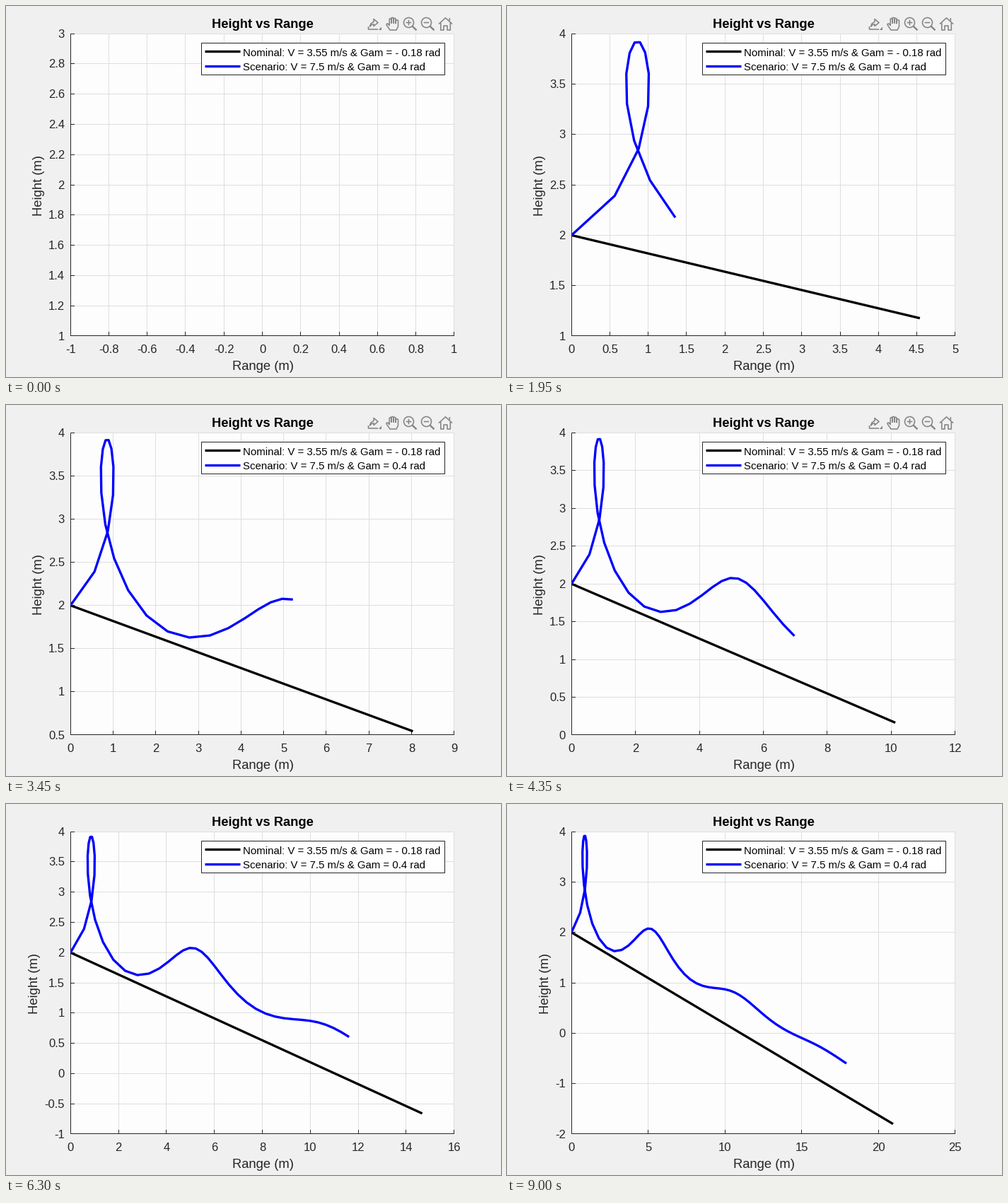
Recreate the animation shown at these times as a matplotlib script. Size 700 by 525 pixels, loop 9150 ms.

```python
import numpy as np
import matplotlib.pyplot as plt
from matplotlib.animation import FuncAnimation
from matplotlib.collections import LineCollection
from matplotlib.patches import Circle, Polygon, Rectangle

plt.rcParams["font.family"] = "Liberation Sans"
plt.rcParams["path.snap"] = False

W, H = 700, 525
PX = 0.72  # points per pixel at 100 dpi
LEFT, RIGHT, TOP, BOTTOM = 91.24, 633.77, 39.1, 466.97
INK, GRID, ICON = "#262626", "#dedede", "#858585"
TICK_SIZE, LABEL_SIZE, LEGEND_SIZE = 16.67, 18.33, 15
FRAMES, STEP_MS = 61, 150
TOOLBAR_FRAMES = 39

# Paper plane: geometry, mass and best-glide aerodynamics
AREA, ASPECT, MASS, GRAV, RHO = 0.017, 0.86, 0.003, 9.8, 1.225
CD0 = 0.02
EPS = 1 / (np.pi * 0.9 * ASPECT)
CL = np.sqrt(CD0 / EPS)
CD = CD0 + EPS * CL**2
GLIDE = -np.arctan(CD / CL)
SPEED = np.sqrt(2 * MASS * GRAV /
                (RHO * AREA * (CL * np.cos(GLIDE) - CD * np.sin(GLIDE))))


def motion(state):
    v, gam = state[:2]
    q = 0.5 * RHO * v**2 * AREA / MASS
    return np.array([-CD * q - GRAV * np.sin(gam),
                     (CL * q - GRAV * np.cos(gam)) / v,
                     v * np.sin(gam),
                     v * np.cos(gam)])


def ode23(f, y, times, rtol=1e-3, floor=1e-3):
    """Adaptive Bogacki-Shampine solver with cubic output between steps."""
    t, end, out = 0.0, times[-1], [y]
    k1 = f(y)
    rate = np.max(np.abs(k1) / np.maximum(np.abs(y), floor))
    h = min(times[1], 0.8 * rtol ** (1 / 3) / rate)
    while len(out) < len(times):
        h = min(h, end / 10)
        if 1.1 * h >= end - t:
            h = end - t
        failed = False
        while True:
            k2 = f(y + h * k1 / 2)
            k3 = f(y + 0.75 * h * k2)
            new = y + h * (2 * k1 + 3 * k2 + 4 * k3) / 9
            k4 = f(new)
            scale = np.maximum(np.maximum(np.abs(y), np.abs(new)), floor)
            err = h * np.max(np.abs(-5 * k1 + 6 * k2 + 8 * k3 - 9 * k4) / 72 / scale)
            if err <= rtol:
                break
            h *= 0.5 if failed else max(0.5, 0.8 * (rtol / err) ** (1 / 3))
            failed = True
        while len(out) < len(times) and times[len(out)] <= t + h + 1e-9:
            s = (times[len(out)] - t) / h
            d = new - y
            out.append(y + h * k1 * s + (3 * d - h * (2 * k1 + k4)) * s**2
                       + (h * (k1 + k4) - 2 * d) * s**3)
        t, y, k1 = t + h, new, k4
        if not failed:
            h /= max(1.25 * (err / rtol) ** (1 / 3), 0.2)
    return np.array(out)


def flight(speed, angle):
    path = ode23(motion, np.array([speed, angle, 2.0, 0.0]),
                 np.linspace(0, 6, FRAMES))
    return path[:, 3], path[:, 2]


def nice_ticks(lo, hi):
    """Finest 1-2-5 step that covers the data in at most ten intervals."""
    if lo == hi:
        lo, hi = lo - 1, hi + 1
    for power in range(-3, 3):
        for m in (1, 2, 5):
            step = m * 10.0**power
            a = np.floor(lo / step + 1e-9)
            b = np.ceil(hi / step - 1e-9)
            if b - a <= 10:
                return np.arange(a, b + 1) * step


def tick_text(v):
    return f"{round(v, 6) + 0.0:g}"


def text_width(s):
    return TICK_SIZE * sum({"-": 0.333, ".": 0.278}.get(c, 0.556) for c in s)


flights = [flight(SPEED, GLIDE), flight(7.5, 0.4)]
colors = ["#000000", "#0000ff"]

fig = plt.figure(figsize=(W / 100, H / 100), dpi=100, facecolor="#f0f0f0")
ax = fig.add_axes([0, 0, 1, 1])
ax.set_xlim(0, W)
ax.set_ylim(H, 0)
ax.axis("off")


def text(x, y, s, size, color=INK, **kw):
    return ax.text(x, y, s, fontsize=size * PX, color=color,
                   va="baseline", zorder=8, **kw)


def stroke(points, width, color, z=5):
    x, y = zip(*points)
    return ax.plot(x, y, color=color, lw=width * PX, zorder=z,
                   solid_capstyle="butt", solid_joinstyle="round")[0]


def segments(color, z):
    return ax.add_collection(
        LineCollection([], colors=color, linewidths=PX, zorder=z), autolim=False)


# Plot area
plot = ax.add_patch(Rectangle((91, 39), 543, 428, fc="#fdfdfd", ec="none", zorder=0))
grid, axes_lines = segments(GRID, 1), segments(INK, 2)
curves = []
for c in colors:
    line = stroke([(0, 0)], 3.33, c, 4)
    line.set_clip_path(plot)
    curves.append(line)

mid_x, mid_y = (LEFT + RIGHT) / 2, (TOP + BOTTOM) / 2
text(mid_x, 31, "Height vs Range", LABEL_SIZE, "black", ha="center", weight="bold")
text(mid_x + 0.5, 515, "Range (m)", LABEL_SIZE, ha="center")
y_title = text(50, mid_y + 0.5, "Height (m)", LABEL_SIZE, ha="center",
               rotation=90, rotation_mode="anchor")

# Legend
ax.add_patch(Rectangle((276.5, 52.5), 344, 45, fc="white", ec=INK, lw=PX, zorder=6))
names = ["Nominal: V = 3.55 m/s & Gam = - 0.18 rad",
         "Scenario: V = 7.5 m/s & Gam = 0.4 rad"]
for i, (name, c) in enumerate(zip(names, colors)):
    stroke([(281.5, 64.5 + 21 * i), (331.5, 64.5 + 21 * i)], 3.33, c, 7)
    text(334.8, 71 + 20.3 * i, name, LEGEND_SIZE, "black")


def make_toolbar():
    def pen(*points):
        return stroke(points, 1.6, ICON)

    def outline(*points):
        return ax.add_patch(Polygon(points, fc="none", ec=ICON, lw=1.6 * PX,
                                    joinstyle="round"))

    parts = [
        # export
        pen((512.5, 29), (512.5, 33), (526, 33)),
        outline((514.5, 29), (516, 25), (520, 22.3), (520, 18.5), (526, 23.5),
                (520, 28.5), (520, 25.8), (517, 26.5)),
        ax.add_patch(Polygon([(531, 29.5), (531, 34), (526.8, 34)], fc=ICON, ec="none")),
        # hand
        outline((543, 34), (538.5, 27.5), (538, 25.5), (540, 25), (542.2, 27.5),
                (542.2, 18.5), (543.5, 17.5), (545, 18.5), (545, 24), (545, 17),
                (546.5, 16.3), (548, 17), (548, 24), (548, 18), (549.5, 17.2),
                (551, 18), (551, 24.5), (551, 20.5), (552.5, 19.5), (554.5, 20.5),
                (554.5, 29), (552, 34)),
        # home
        pen((612, 25.5), (621.5, 16.8), (631, 25.5)),
        pen((614.8, 24), (614.8, 34), (619, 34), (619, 28), (624, 28),
            (624, 34), (628.3, 34), (628.3, 24)),
        pen((627.3, 17), (627.3, 21)),
    ]
    # zoom in and out
    for x, plus in ((569.5, True), (594.5, False)):
        parts += [ax.add_patch(Circle((x, 23.5), 7, fc="none", ec=ICON, lw=1.6 * PX)),
                  stroke([(x + 5, 28.5), (x + 11, 34.3)], 2.4, ICON),
                  pen((x - 3.8, 23.5), (x + 3.8, 23.5))]
        if plus:
            parts.append(pen((x, 19.7), (x, 27.3)))
    return parts


toolbar = make_toolbar()
tick_labels = []


def centre(v):
    return np.floor(v) + 0.5


def draw(k):
    shown = [(x[:k + 1], y[:k + 1]) for x, y in flights]
    xs, ys = (np.concatenate(part) for part in zip(*shown))
    xt, yt = nice_ticks(xs.min(), xs.max()), nice_ticks(ys.min(), ys.max())

    def to_x(v):
        return LEFT + (v - xt[0]) / (xt[-1] - xt[0]) * (RIGHT - LEFT)

    def to_y(v):
        return BOTTOM - (v - yt[0]) / (yt[-1] - yt[0]) * (BOTTOM - TOP)

    for line, (x, y) in zip(curves, shown):
        line.set_data(to_x(x), to_y(y))

    l, r, t, b = (centre(v) for v in (LEFT, RIGHT, TOP, BOTTOM))
    gx, gy = centre(to_x(xt)), centre(to_y(yt))
    grid.set_segments([[(x, t), (x, b)] for x in gx]
                      + [[(l, y), (r, y)] for y in gy])
    axes_lines.set_segments([[(l, t), (l, b + 0.5)], [(l, b), (r + 0.5, b)]]
                            + [[(x, b), (x, b - 5.5)] for x in gx]
                            + [[(l, y), (l + 5.5, y)] for y in gy])

    while tick_labels:
        tick_labels.pop().remove()
    for v in xt:
        tick_labels.append(text(to_x(v), 491, tick_text(v), TICK_SIZE, ha="center"))
    for v in yt:
        tick_labels.append(text(83, to_y(v) + 5.6, tick_text(v), TICK_SIZE, ha="right"))
    widest = max(text_width(tick_text(v)) for v in yt)
    y_title.set_x(83 - widest - 9.3)

    for part in toolbar:
        part.set_visible(k < TOOLBAR_FRAMES)
    return curves


anim = FuncAnimation(fig, draw, frames=FRAMES, interval=STEP_MS, repeat=True, blit=False)
plt.show()
```
